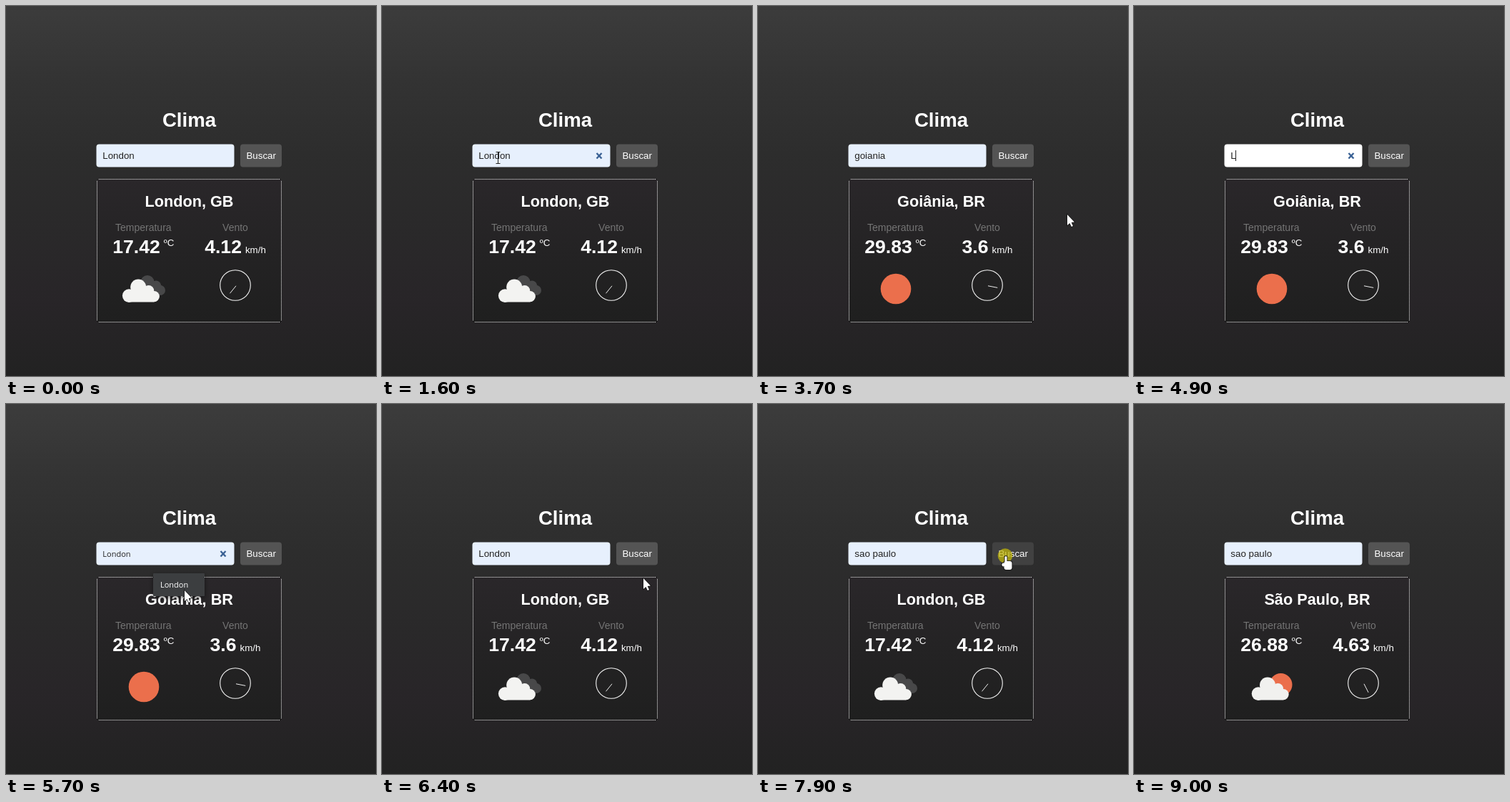
These frames come from a looping animation (518 by 518 pixels, 9100 ms). An HTML page with a canvas:

```html
<!DOCTYPE html>
<html lang="pt-BR">
<head>
<meta charset="utf-8">
<title>Clima</title>
<style>
  html, body { margin: 0; width: 100%; height: 100%; overflow: hidden; background: #2b2b2b; }
  canvas { display: block; width: 518px; height: 518px; }
</style>
</head>
<body>
<canvas id="stage" width="518" height="518"></canvas>
<script>
const SIZE = 518, LOOP = 9100, STEP = 100;
const ctx = document.getElementById('stage').getContext('2d');
const SANS = '"Liberation Sans", Arial, sans-serif';
const UI = '"Open Sans", "Noto Sans", sans-serif';
const ORANGE = '#eb6f4c', BACK_CLOUD = '#484849';

const london = { query: 'London', city: 'London, GB', temp: '17.42', wind: '4.12', sky: 'clouds', degrees: 129 };
const goiania = { query: 'goiania', city: 'Goiânia, BR', temp: '29.83', wind: '3.6', sky: 'sun', degrees: 11 };
const saoPaulo = { query: 'sao paulo', city: 'São Paulo, BR', temp: '26.88', wind: '4.63', sky: 'mixed', degrees: 63 };

// Every search: focus the field, type, pick the suggestion, submit, leave.
const searches = [
  { place: goiania, focus: 1300, type: 2400, pick: 3000, submit: 3400, result: 3500, leave: 3700,
    menu: [239, 243], exit: [433, 292], drag: 60 },
  { place: london, focus: 4100, type: 4900, pick: 5900, submit: 6200, result: 6300, leave: 6400,
    menu: [250, 261], exit: [366, 244], drag: 135 },
  { place: saoPaulo, focus: 6500, type: 7200, pick: 7700, submit: 7900, result: 8200, leave: 8400,
    menu: [240, 248], exit: [497, 298], drag: 125 }
];
const entrance = { leave: 100, exit: [298, 375] };
const FIELD = [222, 212], BUTTON = [347, 212];
const DRAG_TIME = 600;

function glide(t, t0, t1, from, to) {
  const k = Math.min(1, Math.max(0, (t - t0) / (t1 - t0)));
  const e = k * k * (3 - 2 * k);
  return from.map((v, i) => v + (to[i] - v) * e);
}

function pointerAt(t) {
  const i = searches.findIndex(s => t <= s.leave);
  if (t < entrance.leave || i < 0) return null;
  const s = searches[i], from = searches[i - 1] || entrance;
  if (t <= s.focus) return glide(t, from.leave, Math.min(s.focus, from.leave + 300), from.exit, FIELD);
  const dragged = (t - s.focus) / DRAG_TIME;
  if (dragged <= 1) return [FIELD[0] - s.drag * Math.sin(Math.PI * dragged), FIELD[1]];
  if (t < s.pick - 400) return t < s.type - 200 ? FIELD : null;
  if (t <= s.pick) return glide(t, s.pick - 400, s.pick - 200, FIELD, s.menu);
  if (t <= s.submit) return glide(t, s.pick, s.submit, s.menu, BUTTON);
  return glide(t, s.submit + 100, s.leave, BUTTON, s.exit);
}

function fieldAt(t) {
  const i = searches.findLastIndex(s => t >= s.focus);
  const s = searches[i], before = (searches[i - 1]?.place || london).query;
  if (!s) return { value: before, state: 'idle' };
  const query = s.place.query;
  if (t >= s.submit) return { value: query, state: 'idle' };
  if (t >= s.pick) return { value: query, state: 'focus' };
  if (t >= s.pick - 200) return { value: query, state: 'preview', suggestion: query };
  if (t >= s.type) {
    const count = Math.min(2, 1 + (t - s.type) / STEP);
    return { value: query.slice(0, count), state: 'typed', suggestion: count > 1 && query };
  }
  return { value: before, state: t >= s.type - 400 ? 'selected' : 'focus' };
}

function text(str, x, y, size, { color = '#fff', weight = 'normal', family = SANS, align = 'left' } = {}) {
  ctx.font = `${weight} ${size}px ${family}`;
  ctx.textAlign = align;
  ctx.fillStyle = color;
  ctx.fillText(str, x, y);
}

function widthOf(str, font) {
  ctx.font = font;
  return ctx.measureText(str).width;
}

function box(x, y, w, h, r, fill) {
  ctx.beginPath();
  ctx.roundRect(x, y, w, h, r);
  ctx.fillStyle = fill;
  ctx.fill();
}

function disc(x, y, r, fill) {
  ctx.beginPath();
  ctx.arc(x, y, r, 0, 7);
  ctx.fillStyle = fill;
  ctx.fill();
}

function fade(y0, y1, ...colors) {
  const g = ctx.createLinearGradient(0, y0, 0, y1);
  colors.forEach((color, i) => g.addColorStop(i / (colors.length - 1), color));
  return g;
}

function line(color, width, ...points) {
  ctx.beginPath();
  points.forEach(p => ctx.lineTo(...p));
  ctx.strokeStyle = color;
  ctx.lineWidth = width;
  ctx.stroke();
}

function drawPage() {
  ctx.fillStyle = fade(0, SIZE, '#3c3c3c', '#333333', '#2d2d2d', '#2a292a', '#282528', '#222222');
  ctx.fillRect(0, 0, SIZE, SIZE);
  text('Clima', 256.5, 169, 27.6, { weight: 'bold', align: 'center' });
}

function drawField(t, { value, state }) {
  const preview = state === 'preview', selected = state === 'selected';
  const family = preview ? UI : SANS, size = preview ? 11 : 13.33;
  const width = widthOf(value, `${size}px ${family}`);
  box(126.5, 193.5, 193, 32, 4, state === 'typed' ? '#fff' : '#e7f0fd');
  if (selected) box(135, 202, width, 15, 0, '#2b7de0');
  text(value, 135.3, 214, size, { color: selected ? '#fff' : '#222', family });
  if (state === 'idle') return;
  for (const s of [-1, 1]) line('#3b6295', 2.4, [304 - 3.5 * s, 206], [304 + 3.5 * s, 213.5]);
  const blinkOff = t >= 1600 && t < 1800;
  if (!preview && !selected && !blinkOff) box(Math.round(135 + width), 202, 1, 15, 0, '#222');
}

function drawButton(hover) {
  box(328, 193.5, 58, 32, 4, hover ? '#414141' : '#545454');
  text('Buscar', 357.2, 214, 13.33, { align: 'center' });
}

function cloud(x, y, fill) {
  disc(x + 9, y - 9, 9.3, fill);
  disc(x + 22, y - 21, 11, fill);
  disc(x + 36.5, y - 16, 7.5, fill);
  disc(x + 44, y - 8, 7.7, fill);
  box(x + 3, y - 15, 46, 15, 6, fill);
}

function drawSky(sky) {
  if (sky === 'sun') return disc(193, 396, 21.3, ORANGE);
  if (sky === 'mixed') {
    disc(205.5, 393, 16, ORANGE);
    return cloud(165, 414.6, '#f1f1ef');
  }
  disc(198, 386.5, 9.5, BACK_CLOUD);
  disc(210, 391.5, 7, BACK_CLOUD);
  disc(216, 398, 7, BACK_CLOUD);
  box(192, 390, 28, 15, 6, BACK_CLOUD);
  cloud(163.2, 414.6, '#f3f3f1');
}

function drawReading(label, value, unit, center, unitY) {
  const valueW = widthOf(value, `bold 26.6px ${SANS}`) + 5;
  const unitW = widthOf(unit, `13.33px ${SANS}`);
  const x = center - (valueW + unitW) / 2;
  text(label, center, 315, 14, { color: '#747474', align: 'center' });
  text(value, x, 346, 26.6, { weight: 'bold' });
  text(unit, x + valueW, unitY, 13.33);
}

function drawCard({ city, temp, wind, sky, degrees }) {
  box(127, 242, 259, 201, 4, fade(242, 443, '#2a272a', '#242324', '#1f1f1f'));
  ctx.setLineDash([1, 1]);
  for (const y of [242.5, 442.5]) line('#f2f2f2', 1, [130, y], [384, y]);
  for (const x of [127.5, 385.5]) line('#f2f2f2', 1, [x, 245], [x, 440]);
  ctx.setLineDash([]);

  text(city, 256.5, 280.5, 21.7, { weight: 'bold', align: 'center' });
  drawReading('Temperatura', temp, 'ºC', 192.3, 336);
  drawReading('Vento', wind, 'km/h', 321, 346);
  drawSky(sky);

  ctx.beginPath();
  ctx.arc(321, 391, 21.3, 0, 7);
  ctx.strokeStyle = '#f4f4f4';
  ctx.lineWidth = 1.1;
  ctx.stroke();
  const a = degrees * Math.PI / 180;
  line('#eee', 1, [322, 391.8], [322 + 13.5 * Math.cos(a), 391.8 + 13.5 * Math.sin(a)]);
}

function drawMenu({ suggestion, state }) {
  if (!suggestion) return;
  ctx.save();
  ctx.shadowColor = 'rgba(0,0,0,.5)';
  ctx.shadowBlur = 6;
  ctx.shadowOffsetY = 2;
  box(206, 237, 72, 32, 1, state === 'preview' ? '#3c3e40' : '#2c2d30');
  ctx.restore();
  text(suggestion, 216, 256.5, 11, { family: UI });
}

function drawBeam(color) {
  line(color, 1, [0.5, -7], [0.5, 8]);
  for (const y of [-7.5, 8.5]) line(color, 1, [-2.5, y], [3.5, y]);
}

function drawHand() {
  for (const [grow, color] of [[0.8, '#111'], [0, '#fff']]) {
    const part = (x, y, w, h, r) => box(x - grow, y - grow, w + 2 * grow, h + 2 * grow, r, color);
    part(-1.5, 1, 3, 14, 1.5);
    part(-5.5, 10.5, 4, 5, 2);
    part(-2.5, 8, 11, 12, 3);
  }
}

function drawArrow() {
  ctx.beginPath();
  [[0, 0], [0, 15], [3.4, 12], [5.8, 17], [8, 16], [5.7, 11], [10, 10.5]].forEach(p => ctx.lineTo(...p));
  ctx.closePath();
  ctx.strokeStyle = '#111';
  ctx.lineWidth = 1.4;
  ctx.stroke();
  ctx.fillStyle = '#fff';
  ctx.fill();
}

function drawPointer(t, [x, y], overButton) {
  const clicked = searches.some(s => [s.focus, s.pick, s.submit].includes(t));
  if (clicked) disc(x - 1, y + 0.5, 10.3, 'rgba(196,184,8,.72)');
  ctx.save();
  ctx.translate(Math.round(x), Math.round(y));
  if (overButton) drawHand();
  else if (y < 226 && x < 320) drawBeam(x < 127 ? '#ddd' : '#222');
  else drawArrow();
  ctx.restore();
}

function draw(now) {
  const t = Math.floor((now % LOOP) / STEP) * STEP;
  const pointer = pointerAt(t), field = fieldAt(t);
  const overButton = pointer && pointer[0] >= 328 && pointer[0] <= 386 && pointer[1] <= 226;
  const shown = searches.findLast(s => t >= s.result);
  drawPage();
  drawField(t, field);
  drawButton(overButton);
  drawCard(shown ? shown.place : london);
  drawMenu(field);
  if (pointer) drawPointer(t, pointer, overButton);
}

const start = performance.now();
function tick() {
  draw(performance.now() - start);
  requestAnimationFrame(tick);
}
tick();
</script>
</body>
</html>
```
